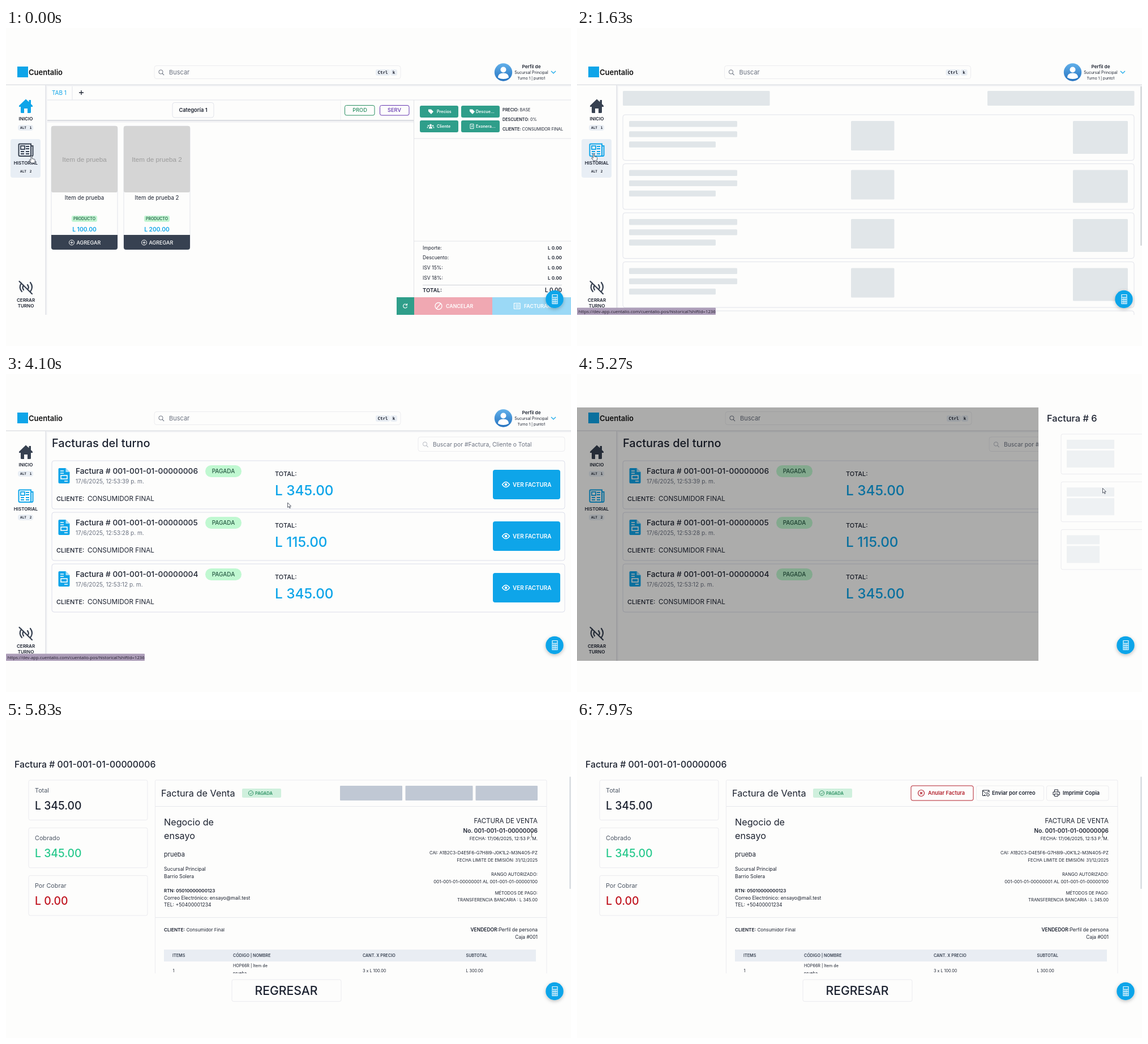
An HTML page that plays this animation: 998x561 px, repeating every 8000 ms.

```html
<!DOCTYPE html>
<html lang="es">
<head>
<meta charset="utf-8">
<title>Facturas del turno</title>
<style>
  html, body { margin: 0; width: 100%; height: 100%; overflow: hidden; background: #fdfdfc; }
  svg { display: block; width: 998px; height: 561px; font-family: Inter, sans-serif; }
  .mono { font-family: "DejaVu Sans Mono", monospace; }
  .arial { font-family: "Liberation Sans", sans-serif; }
</style>
</head>
<body>
<svg id="stage" viewBox="0 0 998 561"></svg>
<script>
const BG = '#fdfdfc', INK = '#1c2230', GRAY = '#6b7280', SLATE = '#374151';
const BLUE = '#0ea5e9', TEAL = '#2f9e8a', GREEN = '#2a8f62', EDGE = '#e1e3ea', BONE = '#e1e6e9';
const LOOP = 8000;

// Drawing helpers, each returning SVG markup
const rect = (x, y, x2, y2, fill, extra = '') =>
  `<rect x="${x}" y="${y}" width="${x2 - x}" height="${y2 - y}" fill="${fill}" ${extra}/>`;
const box = (x, y, x2, y2, stroke = EDGE, rx = 4, fill = BG) =>
  rect(x, y, x2, y2, fill, `rx="${rx}" stroke="${stroke}"`);
const text = (x, y, size, str, fill = INK, weight = 400, anchor = 'start', extra = '') =>
  `<text x="${x}" y="${y}" font-size="${size}" fill="${fill}" font-weight="${weight}" text-anchor="${anchor}" ${extra}>${str}</text>`;
const mid = (x, y, size, str, fill, weight, extra) => text(x, y, size, str, fill, weight, 'middle', extra);
const end = (x, y, size, str, fill, weight) => text(x, y, size, str, fill, weight, 'end');
const line = (d, stroke = EDGE, width = 1, extra = '') =>
  `<path d="${d}" fill="none" stroke="${stroke}" stroke-width="${width}" ${extra}/>`;
const shape = (d, fill, extra = '') => `<path d="${d}" fill="${fill}" ${extra}/>`;
const circle = (x, y, r, fill, extra = '') => `<circle cx="${x}" cy="${y}" r="${r}" fill="${fill}" ${extra}/>`;
const ring = (x, y, r, stroke, width = 1) => circle(x, y, r, 'none', `stroke="${stroke}" stroke-width="${width}"`);
const group = (id, body, extra = '') => `<g id="${id}" ${extra}>${body}</g>`;
const at = (x, y, body) => `<g transform="translate(${x} ${y})">${body}</g>`;
const bold = str => `<tspan font-weight="600">${str}</tspan>`;
const lens = (x, y, color) => ring(x, y, 3.6, color) + line(`M${x + 2.6} ${y + 2.6}l3 3`, color, 1.2);
const key = (x, x2, y, y2, size, str) =>
  rect(x, y, x2, y2, '#e9eef4', 'rx="3"') + mid((x + x2) / 2, (y + y2) / 2 + size * .36, size, str, INK, 700, 'class="mono"');

const header = rect(0, 59, 998, 100, BG) + rect(0, 99.5, 998, 101, '#dfe1e6') + rect(0, 101, 998, 103, '#f3f4f6') +
  rect(20, 68, 39, 87, BLUE) + text(40, 82.5, 13, 'Cuentalio', '#111', 600) +
  group('search', box(262, 66.5, 697, 89.5, '#ececef') + lens(273.5, 77.5, GRAY) +
    text(288, 81.5, 11, 'Buscar', GRAY) + key(653, 678, 73, 84, 7.5, 'Ctrl') + key(679, 691, 73, 84, 7.5, 'k')) +
  group('profile', circle(878.5, 78, 15.7, 'url(#avatar)') + circle(878.5, 73.5, 5, '#fff') +
    shape('M869 87.5q0-8 9.500-8t9.500 8q-9.500 5-19 0z', '#fff') +
    mid(928, 71, 8.2, 'Perfil de', INK, 600) + mid(928, 81, 7, 'Sucursal Principal') +
    mid(928, 90.7, 6.6, 'Turno 1 | punto1') + line('M963 76l4 4 4-4', BLUE, 1.2));

const newspaper = line('M26.500 204.500h17.500v20q0 1.500 1.500 1.500h-21q-2 0-2-2v-18q0-1.500 1.500-1.500zM44 208h3.500v16q0 2-2 2', 'currentColor', 2) +
  rect(26, 208, 33, 214, 'none', 'stroke="currentColor" stroke-width="1.800"') +
  line('M35 209h6M35 213h6M26 218h6M35 218h6M26 222h6M35 222h6', 'currentColor', 1.8);
const altKey = (n, y) => rect(21, y - 5, 48, y + 5, '#e9eef4', 'rx="4"') +
  mid(30.5, y + 2.2, 6, 'ALT', INK, 700, 'class="mono"') + mid(43.5, y + 2.2, 6, n, INK, 700, 'class="mono"');
const sidebar = rect(0, 101, 70, 506, BG) + rect(69.5, 101, 71, 506, '#dfe1e6') + rect(71, 101, 73, 506, '#f5f5f7') +
  group('hover', rect(8, 196, 61, 264, '#e8eef5', 'rx="4"')) +
  group('homeIcon', shape('M35 125.500L23 137v2h3v9.500q0 1.500 1.500 1.500h4.500v-8h6v8h4.500q1.500 0 1.500-1.500V139h3v-2l-3-3v-7h-3.500v3.500z', 'currentColor')) +
  mid(35, 163.2, 8, 'INICIO', INK, 600) + altKey(1, 176) +
  group('newsIcon', newspaper) + mid(35, 241, 8, 'HISTORIAL', INK, 600) + altKey(2, 253) +
  line('M23.500 447l22.500 22M27 450q-5 8 1 15M31 454q-3 4 0 8M43 465q6-8 0-16M39 460q2-3-1-7', SLATE, 2.2, 'stroke-linecap="round"') +
  mid(35, 483, 8, 'CERRAR', INK, 600) + mid(35, 493.3, 8, 'TURNO', INK, 600);

const product = (x, name, price) => {
  const c = x + 58.5;
  return box(x, 173, x + 117, 391) + rect(x, 173, x + 117, 290, '#d5d5d5', 'rx="3"') +
    mid(c, 236, 11.7, name, '#9b9b9b', 400, 'class="arial"') + mid(c, 303, 9.7, name) +
    rect(c - 22.5, 331, c + 22.5, 342, '#c3f5d3', 'rx="3"') + mid(c, 339.2, 6.9, 'PRODUCTO', '#276749', 600) +
    mid(c, 359, 10.3, price, BLUE, 600) +
    shape(`M${x} 365h117v22q0 4-4 4h-109q-4 0-4-4z`, SLATE) +
    ring(x + 36, 378.5, 4.5, '#fff') + line(`M${x + 33.5} 378.500h5M${x + 36} 376v5`, '#fff') +
    text(x + 44.5, 382, 9, 'AGREGAR', '#fff', 500);
};
const action = (x, y, name, icon) => rect(x, y, x + 68, y + 21, TEAL, 'rx="3"') + at(x + 19, y + 10.5, icon) +
  text(x + (name.length > 7 ? 26 : 30), y + 13.4, 7.1, name, '#fff', 600);
const tag = shape('M-4-4h5l4 4-4 4.500-5-5z', '#fff');
const people = circle(0, -2, 2, '#fff') + shape('M-3 4q0-4 3-4t3 4z', '#fff') + circle(-4, -1, 1.3, '#fff') + circle(4, -1, 1.3, '#fff') +
  line('M-5.500 3v-2M5.500 3v-2', '#fff', 1.5);
const sheet = line('M-3-4h6v8h-6zM-1-1h3M-1 1h2', '#fff');
const home = line('M71 127h927M117 101v26', EDGE) + line('M71 100.500h46', BLUE) +
  text(81, 117.7, 10, 'TAB 1', BLUE) + line('M129 114h8M133 110v8', INK, 1.3) +
  rect(71, 162, 720, 164, '#dadce1') + rect(71, 164, 720, 167, '#f3f3f5') +
  box(294, 131.5, 367, 158) + mid(330.5, 148.2, 9.3, 'Categoría 1', INK, 600) + line('M591 128v34', '#efeff2') +
  box(598.5, 136.5, 651, 154, GREEN, 3) + mid(625, 148.3, 9.2, 'PROD', GREEN, 500) +
  box(660.5, 136.5, 712, 154, '#6536b0', 3) + mid(686, 148.3, 9.2, 'SERV', '#6536b0', 500) +
  product(80, 'Item de prueba', 'L 100.00') + product(208, 'Item de prueba 2', 'L 200.00') +
  line('M720.500 127v379M721 195h277M721 376h277', '#e2e3e7') +
  action(731, 137, 'Precios', tag) + action(804, 137, 'Descue...', tag) +
  action(731, 163, 'Cliente', people) + action(804, 163, 'Exonera...', sheet) +
  [['PRECIO:', 'BASE'], ['DESCUENTO:', '0%'], ['CLIENTE:', 'CONSUMIDOR FINAL']]
    .map(([k, v], i) => text(877, 147 + i * 16.8, 7.2, bold(k) + ' ' + v)).join('') +
  ['Importe:', 'Descuento:', 'ISV 15%:', 'ISV 18%:']
    .map((k, i) => text(736, 390.5 + i * 17.8, 8.6, k) + end(982, 390.5 + i * 17.8, 8.2, 'L 0.00', INK, 600)).join('') +
  line('M736 453.500h246', '#cfd2d8') + text(736, 466, 9.6, 'TOTAL:', INK, 600) + end(982, 466, 9.8, 'L 0.00', INK, 600) +
  rect(690, 475, 721, 506, TEAL) + line('M708 488.500a3.500 3.500 0 1 0 .5 3M708.500 486v3h-3', '#fff', 1.1) +
  rect(721, 475, 859, 506, '#f0a8b2') + ring(764, 490.5, 6, '#fff', 1.3) + line('M760 495l8-9', '#fff', 1.3) +
  text(777, 494, 8.8, 'CANCELAR', '#fff', 600) +
  rect(859, 475, 998, 506, '#9bd9f6') + line('M897.500 485.500h10.500v10h-10.500zM900 488h6M900 490.500h6M900 493h6', '#fff', 1.2) +
  text(915, 494, 8.8, 'FACTURAR', '#fff', 600);

const bone = (x, y, x2, y2) => rect(x, y, x2, y2, BONE, 'rx="1.500"');
const loading = bone(81, 111, 340.5, 137) + bone(725, 111, 984.5, 137) +
  [0, 1, 2, 3, 4].map(i => at(0, i * 86.5, box(81, 153, 984, 233.5) +
    bone(92, 164, 283, 174.5) + bone(92, 182.3, 283, 192.5) + bone(92, 200.3, 245, 210.7) +
    bone(484, 164, 560.5, 216) + bone(876, 164, 973, 222))).join('') +
  rect(995, 59, 998, 384, '#d9dcdf', 'rx="1"');

const invoiceRow = (i, number, time, total) => at(0, i * 91,
  box(81, 153, 987, 238, '#dcdeea') +
  shape('M94.500 166h11l7 7v18q0 2-2 2h-16q-2 0-2-2v-23q0-2 2-2z', BLUE) + shape('M105.500 166v7h7', '#a9dff8') +
  line('M96 171h6M96 175h6M103 189h6', BG, 1.6) + rect(97, 179, 108, 185, 'none', `stroke="${BG}" stroke-width="1.600"`) +
  text(123, 176, 13.7, `Factura # 001-001-01-0000000${number}`, INK, 500) +
  text(123, 193, 10.1, `17/6/2025, 12:53:${time} p. m.`, GRAY) +
  rect(352, 161, 416, 182, '#c0f8d1', 'rx="10.500"') + mid(384, 175.2, 10, 'PAGADA', '#285b45', 500) +
  text(89, 224, 11, 'CLIENTE:', INK, 500) + text(144, 224, 11.7, 'CONSUMIDOR FINAL') +
  text(475, 180, 11, 'TOTAL:', INK, 500) + text(475, 214, 24.3, total, BLUE, 500) +
  rect(860, 169, 979, 221, BLUE, 'rx="4"') +
  line('M876.500 195q6.500-9 13 0q-6.500 9-13 0z', '#fff', 1.3) + circle(883, 195, 2.3, '#fff') +
  text(895, 199, 9.9, 'VER FACTURA', '#fff', 600));
const list = text(81, 129, 20, 'Facturas del turno', INK, 500) +
  box(728, 111, 987, 136.5, '#ececef') + lens(740, 123.5, '#b6bac2') +
  text(754, 127.7, 10.3, 'Buscar por #Factura, Cliente o Total', GRAY) +
  invoiceRow(0, 6, 39, 'L 345.00') + invoiceRow(1, 5, 28, 'L 115.00') + invoiceRow(2, 4, 12, 'L 345.00');

const summary = [['Total', 'L 345.00', INK], ['Cobrado', 'L 345.00', '#28c98d'], ['Por Cobrar', 'L 0.00', '#c0141f']];
const cardY = i => 106 + i * 84.2;
const frames = summary.map((_, i) => box(40, cardY(i), 250, cardY(i) + 70.5, '#ebebef', 3)).join('');
const drawerBones = text(15, 83.5, 16.4, 'Factura # 6', INK, 500) + summary.map((_, i) => {
  const y = cardY(i), right = i < 2 ? 134 : 108;
  return rect(50, y + 10, right, y + 26, '#eef1f3') + rect(50, y + 29, right, y + 59, '#eef1f3');
}).join('');

const issuer = [[186, 16.2, 'Negocio de'], [209.5, 16.2, 'ensayo'], [240.5, 11, 'prueba'], [266, 8.7, 'Sucursal Principal'],
  [278.5, 8.7, 'Barrio Solera'], [304, 8, bold('RTN: 05010000000123')],
  [316.5, 8.6, 'Correo Electrónico: ensayo@mail.test'], [329, 8.6, 'TEL: +50400001234'],
  [373.3, 8.2, bold('CLIENTE:') + ' Consumidor Final']];
const fiscal = [[182, 11.5, 'FACTURA DE VENTA'], [198.8, 10, bold('No. 001-001-01-00000006')],
  [211.7, 8, 'FECHA: 17/06/2025, 12:53 P. M.'], [237, 7.8, 'CAI: A1B2C3-D4E5F6-G7H8I9-J0K1L2-M3N4O5-PZ'],
  [249.5, 7.6, 'FECHA LIMITE DE EMISIÓN: 31/12/2025'], [275, 7.7, 'RANGO AUTORIZADO:'],
  [287.5, 8, '001-001-01-00000001 AL 001-001-01-00000100'], [308, 7.6, 'MÉTODOS DE PAGO:'],
  [320, 7.6, 'TRANSFERENCIA BANCARIA : L 345.00'],
  [373.3, 8.5, bold('VENDEDOR:') + 'Perfil de persona'], [385.7, 8.5, 'Caja #001']];
const slots = [[590, 700], [705.5, 824.5], [829.5, 939]];
const button = (i, name, textX, color, icon) => box(slots[i][0], 116, slots[i][1], 142, i ? '#ececef' : color, 3) +
  icon + text(textX, 132.3, 9.2, name, color, 600);
const buttons = button(0, 'Anular Factura', 620, '#b3202c', ring(608, 129, 5.5, '#b3202c', 1.2) + line('M606 127l4 4M610 127l-4 4', '#b3202c', 1.2)) +
  button(1, 'Enviar por correo', 733, INK, line('M728 128v-4h-11.500v9.500h6M716.500 124.500l6 5 5.500-5M719 133l2-2', INK) + ring(726, 132, 2.3, INK)) +
  button(2, 'Imprimir Copia', 858, INK, line('M843.500 127v-4h6v4M843.500 132h-2.500v-5h11.500v5h-2.500M843.500 130.500h6v4h-6z', INK));
const detail = text(15, 83.5, 15.8, 'Factura # 001-001-01-00000006', INK, 500) +
  summary.map(([k, v, color], i) => text(51, cardY(i) + 22, 10.8, k, '#4b5563') + text(51, cardY(i) + 51.5, 19.4, v, color, 500)).join('') +
  `<g clip-path="url(#sheetClip)">${box(263.5, 106, 955, 470, '#ebebef', 2)}${line('M264 152.500h691M264 348.500h691', '#e6e7ec')}` +
  text(274, 135, 16.3, 'Factura de Venta') + rect(417, 121, 486, 137, '#cff0dd', 'rx="2"') +
  ring(432.5, 129, 4.2, GREEN) + line('M430.500 129l1.500 1.500 3-3', GREEN) + text(440, 131.8, 7.5, 'PAGADA', GREEN, 600) +
  issuer.map(([y, size, str]) => text(279, y, size, str)).join('') +
  fiscal.map(([y, size, str]) => end(939, y, size, str)).join('') +
  rect(279, 405, 936, 426, '#e9edf3') +
  [[294, 'ITEMS'], [401, 'CÓDIGO | NOMBRE'], [630, 'CANT. X PRECIO'], [812.5, 'SUBTOTAL']]
    .map(([x, s]) => text(x, 418, 7.2, s, SLATE, 600)).join('') +
  [[294.5, 445, '1'], [401, 436.2, 'HOP66R | Item de'], [401, 449, 'prueba'], [630, 445, '3 x L 100.00'], [812.5, 445, 'L 300.00']]
    .map(([x, y, s]) => text(x, y, 7.2, s)).join('') +
  group('pending', slots.map(([x, x2]) => rect(x, 116, x2, 142, '#c0c8d4', 'rx="1"')).join('')) +
  group('buttons', buttons) + '</g>' +
  box(399, 458, 592, 496.5, '#ebebef', 3) + mid(495, 485, 21.2, 'REGRESAR', INK, 500) +
  rect(995, 100, 998, 298, '#dde1e5', 'rx="1"');

const fab = circle(969, 478.5, 15.7, BLUE, 'filter="url(#shadow)"') +
  line('M965 470.500h9v16h-9zM965 475h9M965 479h9M965 483h9M968 475v11M971 475v11', '#fff', 1.1);
const status = rect(0, 493.5, 245, 506, '#ac9db8', 'rx="1"') +
  text(2.5, 503, 7.7, 'https://dev-app.cuentalio.com/cuentalio-pos/historical?shiftId=1236', '#211b2b', 400, 'start', 'style="font-family:Open Sans,sans-serif"');
const edge = `stroke="#444b58" stroke-width=".9" stroke-linejoin="round"`;
const cursors =
  group('hand', shape('M-1 1q1-2 2 0v4.500l4 1q1.500.5 1.300 2l-.8 4.500h-6l-3.500-5q.5-1.500 3 .5z', '#fff', edge)) +
  group('arrow', shape('M0 0v8.500l2-1.700 1.500 3 1.300-.6-1.500-3h2.700z', '#fff', edge)) +
  group('beam', line('M-1.500-5q1.500 0 1.500 1v8q0 1-1.500 1M1.500-5q-1.500 0-1.500 1M0 4q0 1 1.500 1', '#555', .9));

document.getElementById('stage').innerHTML = `<defs>
  <linearGradient id="avatar" x2="0" y2="1"><stop stop-color="#62b0ea"/><stop offset="1" stop-color="#2472c0"/></linearGradient>
  <filter id="shadow" x="-50%" y="-50%" width="200%" height="200%"><feDropShadow dx="0" dy="2" stdDeviation="3" flood-opacity=".25"/></filter>
  <clipPath id="app"><rect y="59" width="998" height="447"/></clipPath>
  <clipPath id="sheetClip"><rect x="263" y="105" width="693" height="342"/></clipPath></defs>
  ${rect(0, 0, 998, 561, BG)}<g clip-path="url(#app)">` +
  group('home', home) + group('loading', loading) + group('list', list) + header + sidebar + group('status', status) +
  group('mask', rect(0, 59, 998, 506, '#000')) +
  group('drawer', rect(0, 59, 998, 506, BG) + frames + group('drawerBones', drawerBones) + group('detail', detail)) +
  group('fab', fab) + group('cursor', cursors) + '</g>';

const el = id => document.getElementById(id);
const show = (id, on) => el(id).setAttribute('visibility', on ? 'inherit' : 'hidden');
const move = (id, x, y = 0) => el(id).setAttribute('transform', `translate(${x} ${y})`);
const progress = (t, from, to) => Math.min(1, Math.max(0, (t - from) / (to - from)));
const smooth = p => p * p * (3 - 2 * p);
const mix = (a, b, p) => a + (b - a) * p;

const NAVIGATE = 850, LISTED = 1850, OPEN = 5140, SLIDE = 5230, LOADED = 5680, READY = 6400;

function render(t) {
  const waiting = t >= NAVIGATE && t < LISTED;
  show('home', t < NAVIGATE);
  show('loading', waiting);
  show('list', t >= LISTED);
  move('search', waiting ? -1.5 : 0);
  move('profile', waiting ? -3 : 0);
  move('fab', waiting ? -3 : 0);
  el('homeIcon').style.color = t < NAVIGATE ? BLUE : SLATE;
  el('newsIcon').style.color = t < NAVIGATE ? SLATE : BLUE;
  show('status', t >= 300 && t < 4300);

  el('mask').setAttribute('opacity', .32 * progress(t, OPEN, OPEN + 120));
  const slide = smooth(progress(t, SLIDE, SLIDE + 150));
  move('drawer', 998 * (1 - slide));
  show('drawer', t >= SLIDE);
  show('drawerBones', t >= SLIDE && t < LOADED);
  show('detail', t >= LOADED);
  show('pending', t >= LOADED && t < READY);
  show('buttons', t >= READY);

  const settle = smooth(progress(t, 100, 700)), travel = smooth(progress(t, 3690, 4490));
  const x = mix(mix(45, 29.5, settle), 928.5, travel);
  const y = travel < .52 ? mix(mix(225, 221, settle), 227, travel / .52) : mix(227, 201.5, (travel - .52) / .48);
  move('cursor', x, y);
  show('hover', x < 61);
  const beam = t >= LOADED, hand = !beam && t < OPEN && (x < 61 || x > 860);
  show('beam', beam);
  show('hand', hand);
  show('arrow', !beam && !hand);
}

const start = performance.now();
function tick() {
  render((performance.now() - start) % LOOP);
  requestAnimationFrame(tick);
}
tick();
</script>
</body>
</html>
```
